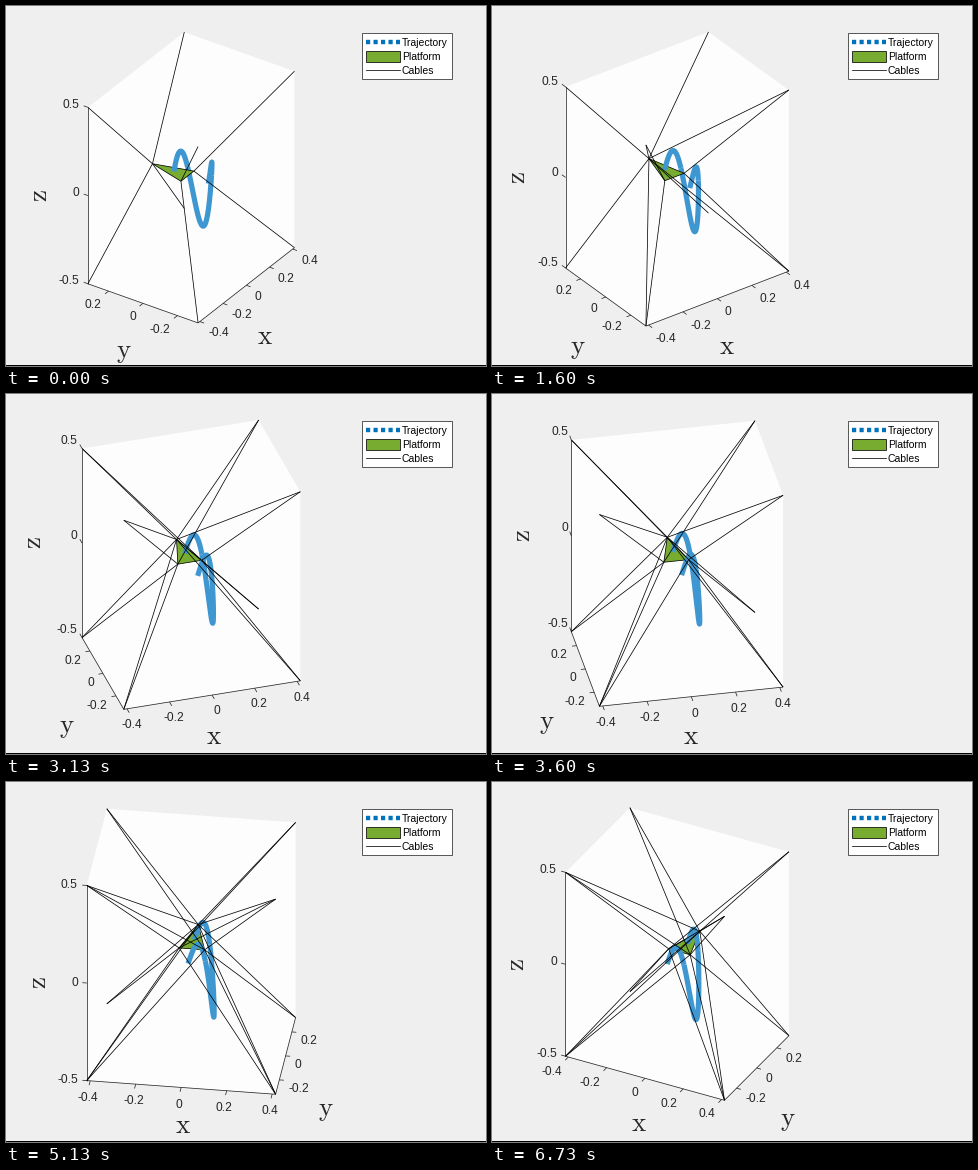
A matplotlib script for the animation above (6.79 s loop, 480 by 360 pixels).

```python
import numpy as np
import matplotlib.pyplot as plt
from matplotlib.animation import FuncAnimation
from matplotlib.collections import LineCollection
from matplotlib.patches import Polygon, Rectangle

W, H, DPI = 480, 360, 100
FRAMES, LOOP = 102, 6790
PX = 72 / DPI                      # points per pixel
HX, HY, HZ = 0.415, 0.32, 0.5      # half sizes of the box
EL = np.radians(31.8)
CX = 185.2
INK, BLUE, GREEN = "#262626", "#0072bd", "#77ac30"
THIN = 0.75 * PX

plt.rcParams["font.family"] = "Liberation Sans"
fig = plt.figure(figsize=(W / DPI, H / DPI), dpi=DPI, facecolor="#efefef")
ax = fig.add_axes([0, 0, 1, 1])
ax.set(xlim=(0, W), ylim=(H, 0))
ax.axis("off")

# Platform vertices and the corners each cable runs to
A, B, C = (0, 0.225, 0), (-0.056, 0.022, 0), (0.056, 0.022, 0)


def corner(sx, sy, sz):
    return (sx * HX, sy * HY, sz * HZ)


def cables(vertex, *signs):
    return [(vertex, corner(*s)) for s in signs]


# In order of appearance: eight at first, the rest one by one
CABLES = np.array(
    cables(A, (-1, 1, 1), (-1, 1, -1), (1, 1, 1), (1, 1, -1))
    + cables(B, (-1, -1, 1), (-1, -1, -1))
    + cables(C, (1, -1, 1), (1, -1, -1))
    + cables(A, (-1, -1, -1), (1, -1, 1), (1, -1, -1), (-1, -1, 1))
    + cables(B, (-1, 1, -1))
    + cables(C, (-1, 1, 1), (1, 1, -1))
    + cables(B, (1, 1, 1))
    + cables(C, (-1, -1, -1), (-1, -1, 1))
    + cables(B, (1, -1, 1), (1, -1, -1))
)

# Path on a cylinder of radius 0.1
th = np.linspace(np.pi / 2, -np.pi / 2, 181)
path_z = -0.158 * np.cos(th) - 0.169 * np.cos(3 * th)
PATH = np.column_stack([0.1 * np.cos(th), 0.1 * np.sin(th), path_z])
LOW = np.where(path_z < 0, 1.0, np.nan)
HIGH = np.where(path_z >= -0.004, 1.0, np.nan)

# Zoom and vertical centre of the fitted box over the turn
KNOTS = [0, 24, 39, 54, 58, 67.5, 77, 90, 101]
ZOOM = [207.6, 213.1, 218.9, 225.6, 229, 244, 229.6, 221.2, 216.4]
MID = [171.5, 173, 172, 169.5, 169.5, 159.3, 169.5, 171, 172]


def camera(k):
    deg = -56 + 0.829 * k
    az = np.radians(deg)
    s, cy = np.interp(k, KNOTS, ZOOM), np.interp(k, KNOTS, MID)

    def project(p):
        x, y, z = np.moveaxis(np.asarray(p, float), -1, 0)
        u = x * np.cos(az) + y * np.sin(az)
        v = z * np.cos(EL) + np.sin(EL) * (y * np.cos(az) - x * np.sin(az))
        return np.stack([CX + s * u, cy - s * v], axis=-1)

    return deg, project


def unit(v):
    return v / np.hypot(*v)


# Moving artists
walls = ax.add_patch(Polygon([(0, 0)] * 3, fc="#fdfdfd", ec="none", zorder=1))
frame = LineCollection([], colors=INK, linewidths=THIN, zorder=2)
ax.add_collection(frame)
path_style = dict(color="#3f97d1", lw=5.2 * PX, solid_capstyle="butt",
                  solid_joinstyle="round")
low, = ax.plot([], [], zorder=3, **path_style)
plate = ax.add_patch(Polygon([(0, 0)] * 3, fc=GREEN, ec="black",
                             lw=THIN, joinstyle="round", zorder=4))
high, = ax.plot([], [], zorder=5, **path_style)
wires = LineCollection([], colors="black", linewidths=THIN, zorder=6)
ax.add_collection(wires)


def tick_texts(values):
    return [(v, ax.text(0, 0, f"{v:g}", size=12 * PX, color=INK,
                        va="center", zorder=7)) for v in values]


x_ticks = tick_texts([-0.4, -0.2, 0, 0.2, 0.4])
y_ticks = tick_texts([-0.2, 0, 0.2])
z_ticks = tick_texts([-0.5, 0, 0.5])


def axis_name(s, rotation=0):
    return ax.text(0, 0, rf"$\mathrm{{{s}}}$", size=27 * PX, color=INK,
                   ha="center", va="center", rotation=rotation,
                   math_fontfamily="cm", zorder=7)


x_name, y_name, z_name = axis_name("x"), axis_name("y"), axis_name("z", 90)


def draw_legend():
    ax.add_patch(Rectangle((356.4, 26.6), 89.4, 46, fc="white", ec=INK,
                           lw=THIN, zorder=8))
    ax.plot([360, 394], [35.6, 35.6], color=BLUE, lw=4.4 * PX, zorder=9,
            dash_capstyle="butt", ls=(0, (4.2 / 4.4, 3.3 / 4.4)))
    ax.add_patch(Rectangle((359.6, 44.5), 34, 11, fc=GREEN, ec="black",
                           lw=THIN, zorder=9))
    ax.plot([359.5, 393.5], [64.2, 64.2], color="black", lw=THIN, zorder=9)
    for y, s in ((39.7, "Trajectory"), (53.7, "Platform"), (67.7, "Cables")):
        ax.text(396, y, s, size=10.4 * PX, color="black",
                va="baseline", zorder=9)


draw_legend()
ax.add_patch(Rectangle((0, 359), W, 1, fc="black", ec="none", zorder=9))


def place_ticks(ticks, project, point, d, drop, beside=False):
    """Put labels beyond the tick ends and return the tick segments."""
    marks = []
    for v, label in ticks:
        p = project(point(v))
        label.set_position(p + 9 * d + (0, drop))
        side = "left" if d[0] > 0 else "right"
        label.set_ha(side if beside or abs(d[0]) > 0.6 else "center")
        marks.append((p, p + 4.5 * d))
    return marks


def update(k):
    deg, project = camera(k)
    a = abs(deg)
    side = -1 if deg < 0 else 1
    if side < 0:
        left, back, right, front = (-1, 1), (1, 1), (1, -1), (-1, -1)
    else:
        left, back, right, front = (-1, -1), (-1, 1), (1, 1), (1, -1)

    hull = project([corner(*left, -1), corner(*left, 1), corner(*back, 1),
                    corner(*right, 1), corner(*right, -1),
                    corner(*front, -1)])
    walls.set_xy(hull)

    x_edge = project([corner(-1, -1, -1), corner(1, -1, -1)])
    y_edge = project([corner(side, -1, -1), corner(side, 1, -1)])
    z_edge = hull[:2]
    to_x = unit(x_edge[1] - x_edge[0])
    to_y = unit(y_edge[1] - y_edge[0])

    marks = place_ticks(x_ticks, project, lambda v: (v, -HY, -HZ), -to_y, 8.5)
    marks += place_ticks(y_ticks, project,
                         lambda v: (side * HX, v, -HZ), side * to_x, 8.5)
    marks += place_ticks(z_ticks, project,
                         lambda v: (left[0] * HX, left[1] * HY, v),
                         to_y if side < 0 else -to_x, 0.5, beside=True)
    frame.set_segments([x_edge, y_edge, z_edge] + marks)

    x_name.set_position(x_edge.mean(0) + (
        -side * (0.43 * a - 5.5), 35.2 + 0.47 * a - 0.003 * a * a))
    y_name.set_position(y_edge.mean(0) + (
        side * (44 - 0.45 * a), 55.3 - 0.12 * a))
    z_name.set_position(z_edge.mean(0) + (-48, 0))

    px, py = project(PATH).T
    low.set_data(px, py * LOW)
    high.set_data(px, py * HIGH)
    plate.set_xy(project([A, B, C]))

    count = 8 + int(np.ceil(k / 6.3))
    wires.set_segments(list(project(CABLES[:count])))
    return []


anim = FuncAnimation(fig, update, frames=FRAMES, interval=LOOP / FRAMES,
                     repeat=True, repeat_delay=0, blit=False)
plt.show()
```
